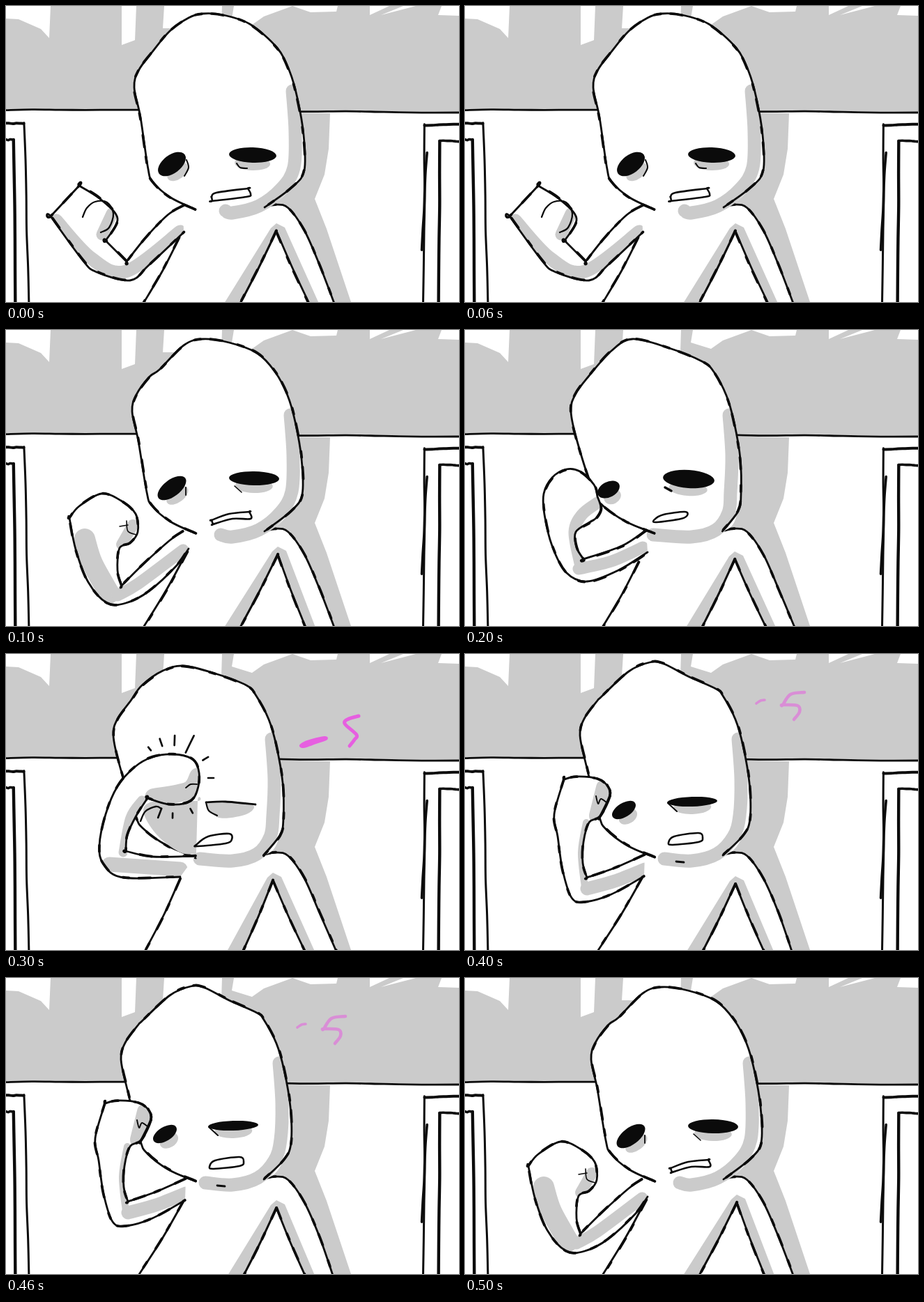
Write an HTML page that moves like this. It is 650x425 px and loops after 600 ms.

```html
<!DOCTYPE html>
<html lang="en">
<head>
<meta charset="utf-8">
<title>Forehead slap</title>
<style>
  html, body { margin: 0; width: 100%; height: 100%; overflow: hidden; background: #fff; }
  svg { display: block; width: 100vw; height: 100vh; }
  path { stroke-linecap: round; stroke-linejoin: round; }
</style>
</head>
<body>
<svg id="stage" viewBox="0 0 650 425"></svg>
<script>
const NS = 'http://www.w3.org/2000/svg';
const INK = '#0b0b0b', GREY = '#cbcbcb';
const stage = document.getElementById('stage');
let layer = stage, clips = 0, seed = 7;

const random = () => (seed = seed * 16807 % 2147483647) / 2147483647;
const wobble = size => (random() - .5) * 2 * size;
const points = text => text.split(' ').map(s => s.split(',').map(Number));

function add(name, attrs, parent = layer) {
  const el = document.createElementNS(NS, name);
  for (const k in attrs) el.setAttribute(k, attrs[k]);
  return parent.appendChild(el);
}

// Smooth curve through the points; a repeated point makes a corner.
function curve(pts, closed) {
  const p = typeof pts === 'string' ? points(pts) : pts;
  const n = p.length;
  const at = i => closed ? p[(i + n) % n] : p[Math.max(0, Math.min(n - 1, i))];
  let d = 'M' + p[0];
  for (let i = 0; i < (closed ? n : n - 1); i++) {
    const [a, b, c, e] = [at(i - 1), at(i), at(i + 1), at(i + 2)];
    const c1 = b.map((v, k) => v + (c[k] - a[k]) / 6);
    const c2 = c.map((v, k) => v - (e[k] - b[k]) / 6);
    d += `C${c1} ${c2} ${c}`;
  }
  return d + (closed ? 'Z' : '');
}

const fill = (color, pts) => add('path', { d: curve(pts, true), fill: color });
const flat = (color, pts) => add('polygon', { points: pts, fill: color });
const line = (pts, w = 2.6, color = INK) =>
  add('path', { d: curve(pts), fill: 'none', stroke: color, 'stroke-width': w });
const shade = (pts, w) => line(pts, w, GREY);

// Uneven pen: a base stroke with heavier dashes over it.
function rough(pts, w = 2.8) {
  line(pts, w);
  const over = line(pts, w + .9);
  over.setAttribute('stroke-dasharray', '17 23 9 14');
  over.setAttribute('transform', `translate(${wobble(.6)} ${wobble(.6)})`);
}

// Ruled by hand: straight with a slight tremble.
function ruled(x1, y1, x2, y2, w) {
  const pts = [];
  for (let i = 0; i <= 5; i++) {
    const t = i / 5;
    pts.push([x1 + (x2 - x1) * t + wobble(.7), y1 + (y2 - y1) * t + wobble(.7)]);
  }
  line(pts, w);
}

function windowFrame(side, outer, inner, top, drift) {
  ruled(side, top, outer, top + 1, 4);
  ruled(outer, top, outer + drift, 427, 3);
  ruled(side, top + 24, inner, top + 24, 3.6);
  ruled(inner, top + 24, inner + drift / 3, 427, 4.4);
}

function room() {
  flat(GREY, '0,18 18,19 50,33 62,46 64,0 166,0 166,56 185,49 187,0 227,0 225,32 309,32 310,0 327,0 324,18 353,27 370,15 411,0 437,9 474,8 476,0 522,0 522,13 550,0 570,0 538,13 588,0 625,0 620,13 650,14 650,152 0,149');
  flat(GREY, '365,152 465,154 463,205 457,242 443,277 460,320 495,425 365,425');
  ruled(0, 149, 190, 149, 2.8);
  ruled(380, 151, 650, 153, 2.8);
  windowFrame(-2, 26, 11, 168, 7);
  windowFrame(652, 601, 622, 170, -2);
  ruled(604, 210, 597, 350, 3.6);
}

// Torso and resting arm, hung from the left armpit and the right one (pit).
function body({ side, hip, pit: [x, y], rib, cuff, hand }) {
  const [sx, sy] = side;
  const shoulder = `370,288 387,285 405,290 428,322 450,372 ${hand},427`;
  add('path', { d: `${curve(shoulder)}L${hip},427L${side}L250,288Z`, fill: '#fff' });
  flat(GREY, `${x - 8},${y - 4} ${x},${y - 11} ${x + 12},${y - 5} ${cuff + 14},427 ${cuff},427 ${x},${y} ${rib},427 ${rib - 23},427`);
  rough([side, [(sx + hip) / 2 + 2, (sy + 427) / 2], [hip, 427]]);
  rough(shoulder);
  rough([[x, y], [(x + rib) / 2 + 1, (y + 427) / 2], [rib, 427]], 3);
  rough([[x, y], [(x + cuff) / 2 - 1, (y + 427) / 2], [cuff, 427]]);
}

// The chin stays put while the rest of the head slides by lean.
function head(lean, crown, chin) {
  const slide = pts => points(pts).map(([x, y]) =>
    [x + lean * Math.max(0, Math.min(1, (292 - y) / (x < 300 ? 100 : 55))), y]);
  const outline = [
    ...slide('272,292 236,275 210,252 203,232 192,160 183,117 189,93 208,67'),
    ...points(crown),
    ...slide('388,60 406,94 417,132 426,185 427,236 410,260 371,289')
  ];
  fill('#fff', outline);
  shade(slide('410,122 414,180 412,232 395,262 363,287').concat([[325, 297], [chin, 294]]), 19);
  rough(outline);
}

function eye(x, y, rx, ry, tilt) {
  const turn = `translate(${x} ${y}) rotate(${tilt})`;
  add('ellipse', { cx: 0, cy: ry + 1, rx: rx * .75, ry: 10, fill: GREY, transform: turn });
  add('ellipse', { rx, ry, fill: INK, transform: turn });
}

const mouth = pts => add('path',
  { d: curve(pts, true), fill: '#fff', stroke: INK, 'stroke-width': 2.6 });

// Shadows are broad strokes kept inside the limb.
function arm(outline, ...shadows) {
  const d = curve(outline), id = 'limb' + clips++;
  add('path', { d }, add('clipPath', { id }));
  add('path', { d, fill: '#fff' });
  const holder = layer;
  layer = add('g', { 'clip-path': `url(#${id})` });
  shadows.forEach(([pts, w]) => shade(pts, w));
  layer = holder;
  rough(outline);
}

function low() {
  body({ side: [249, 332], hip: 197, pit: [388, 323], rib: 336, cuff: 435, hand: 471 });
  head(1, '235,36 262,17 282,11 312,13 350,26', 315);
  eye(238, 227, 23, 13, -37);
  eye(354, 214, 34, 11, 2);
  line('259,221 262,232 256,244', 2);
  line('331,226 336,232 346,233', 2);
  mouth('295,274 295,274 302,268 347,262 347,262 351,270 345,274 296,280 296,280');
  arm('254,287 232,300 200,333 173,367 173,367 143,337 143,337 160,305 135,277 105,258 105,258 64,302 64,302 110,365 130,382 178,394 205,372 255,325',
    ['72,308 122,362 172,381 250,324', 19], ['152,298 138,328', 17]);
  line('110,303 116,290 128,281 145,282 154,298 148,318 136,325', 2.3);
}

function raised() {
  body({ side: [260, 318], hip: 197, pit: [390, 322], rib: 336, cuff: 430, hand: 471 });
  head(-2, '220,57 255,22 282,13 320,18 360,33', 308);
  eye(238, 227, 24, 12, -37);
  eye(356, 213, 36, 10, 1);
  line('258,226 258,237', 1.8);
  line('328,224 338,233', 1.6);
  mouth('295,273 295,273 320,264 349,261 349,261 351,271 325,271 297,279 297,279');
  arm('254,289 235,302 195,338 166,367 166,367 160,345 163,313 178,306 189,290 186,264 165,245 137,235 105,253 91,270 91,270 100,315 118,362 145,392 172,392 205,375 245,338 262,314',
    ['113,300 124,335 148,378', 30], ['160,381 190,364 254,316', 17], ['182,280 166,308', 16]);
  line('163,282 175,280', 1.5);
  line('173,274 175,289 187,294', 1.6);
}

function touching() {
  body({ side: [249, 333], hip: 197, pit: [387, 329], rib: 340, cuff: 432, hand: 473 });
  head(-31, '210,30 240,13 290,25 340,45', 270);
  eye(321, 214, 37, 13, 4);
  line('287,226 296,231', 3.5);
  mouth('271,273 285,265 315,261 319,266 310,271 275,276');
  arm('260,287 225,310 170,329 170,329 160,312 159,290 179,276 188,270 195,256 190,239 190,239 185,222 165,203 145,200 125,212 113,235 114,265 125,310 145,348 175,361 220,345 262,319',
    ['190,248 168,265 157,290 165,335', 17], ['163,343 210,332 255,312', 17]);
  eye(206, 229, 17, 11, -28);
}

function slap() {
  body({ side: [250, 322], hip: 199, pit: [383, 325], rib: 340, cuff: 429, hand: 474 });
  head(-29, '195,45 225,24 255,17 300,28 345,45', 278);
  fill(GREY, '197,225 215,211 275,211 275,211 273,288 273,288 248,284 215,258');
  fill(GREY, '290,214 352,216 345,230 305,235');
  line('287,213 315,212 358,216', 2.8);
  line('287,213 291,225 303,232', 2.2);
  mouth('273,274 290,262 320,258 324,266 315,272 275,276');
  arm('272,290 210,291 172,283 172,283 174,260 187,232 203,207 203,207 235,216 265,211 276,190 276,165 266,150 240,144 210,148 185,162 160,190 143,230 134,275 140,302 168,321 250,320',
    ['212,206 262,196 276,176', 26], ['195,210 178,235 168,285', 13], ['148,302 250,309', 21]);
  line('258,192 265,187 274,187', 2);
  line('193,240 200,226 215,219 223,222', 2.4);
  // Impact marks around the fist: angle and length.
  const marks = [[-129, 6], [-109, 11], [-88, 14], [-64, 27], [-31, 9], [0, 8], [61, 7], [91, 7], [111, 14]];
  for (const [deg, len] of marks) {
    const a = deg * Math.PI / 180;
    const spot = r => [240 + r * Math.cos(a), 178 + r * Math.sin(a)];
    line([spot(54 - len / 2), spot(54 + len / 2)], 2.7);
  }
  fill('#e65fe0', '421,131 432,124 457,118 461,123 445,129 427,135');
  line('506,89 492,93 486,100 503,116 500,123 493,132', 5, '#e65fe0');
}

function rebound() {
  body({ side: [255, 320], hip: 190, pit: [388, 330], rib: 341, cuff: 429, hand: 469 });
  head(-18, '195,62 235,25 265,12 285,14 320,32 360,50', 286);
  eye(228, 224, 19, 10, -32);
  eye(326, 212, 36, 7, -2);
  line('291,214 304,226', 2);
  line('303,298 314,299', 2.8);
  mouth('292,271 300,262 335,257 341,264 335,270 298,274');
  arm('258,288 215,307 175,321 175,321 169,300 170,270 178,242 194,233 208,205 205,190 190,179 160,176 142,180 142,180 128,230 133,262 140,310 153,350 172,356 210,345 257,319',
    ['200,192 190,232', 24], ['174,242 167,285 172,335', 10], ['175,337 215,326 258,309', 19]);
  line('188,204 191,215 195,208 203,213', 2);
  line('204,188 208,203 192,237', 3.6);
  line('418,71 424,67 430,66', 3.6, '#d98ed6');
  line('487,55 467,58 456,73 456,73 477,74 480,83 472,94', 4.6, '#d98ed6');
}

room();
const poses = [low, raised, touching, slap, rebound];
const order = [low, raised, touching, slap, rebound, raised];

for (const paint of poses) {
  layer = add('g', { opacity: 0 }, stage);
  const group = layer;
  paint();
  const steps = order.map((p, k) => ({
    opacity: p === paint ? 1 : 0, offset: k / order.length, easing: 'step-end'
  }));
  steps.push({ opacity: steps.at(-1).opacity, offset: 1 });
  group.animate(steps, { duration: 100 * order.length, iterations: Infinity });
}
</script>
</body>
</html>
```
